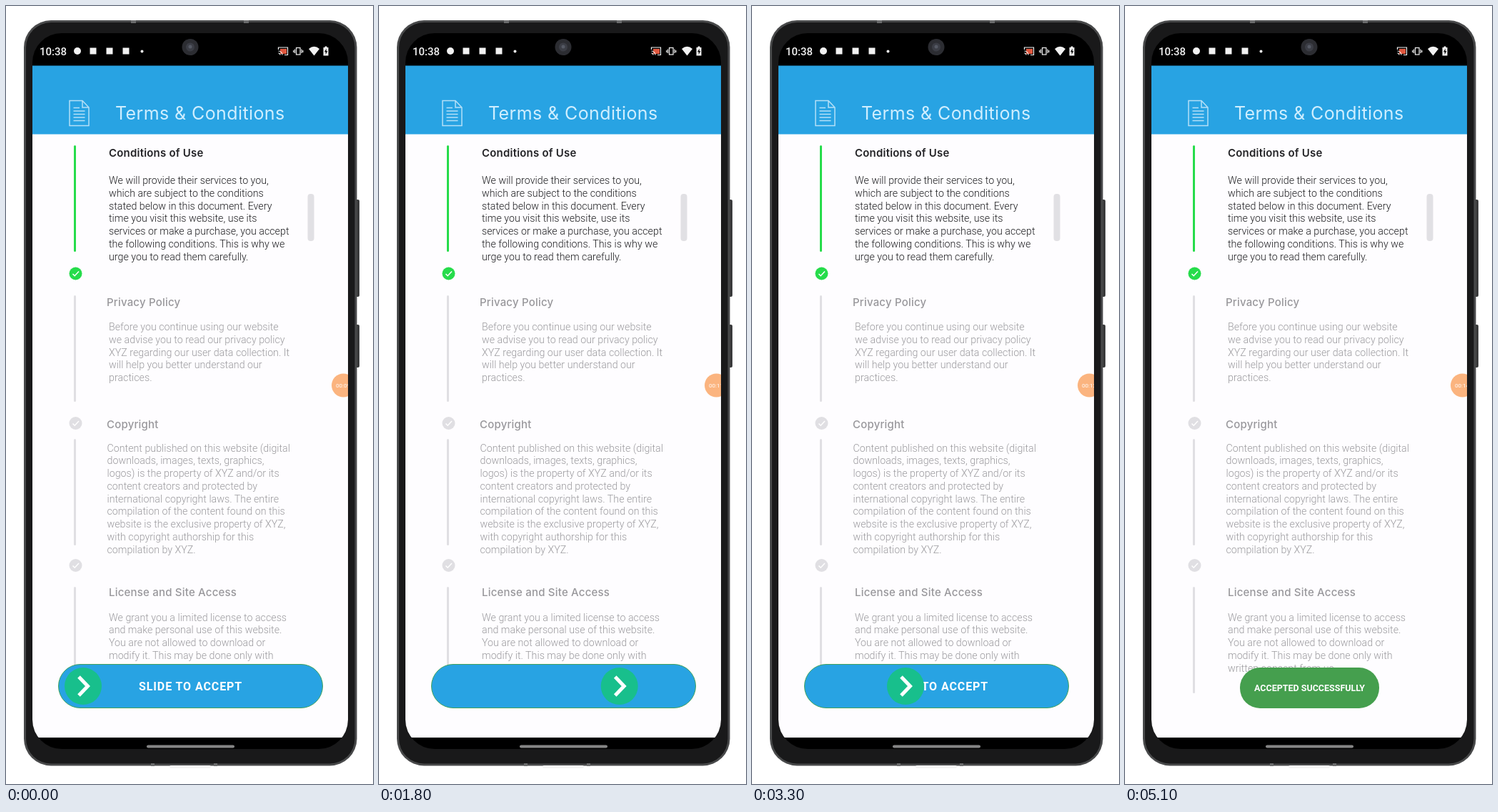
An HTML page for the animation above (5200 ms loop, 514x1089 px).

```html
<!DOCTYPE html>
<html lang="en">
<head>
<meta charset="utf-8">
<title>Terms &amp; Conditions</title>
<style>
  html, body { margin: 0; width: 100%; height: 100%; overflow: hidden; background: #fff; }
  svg { display: block; width: 100%; height: 100%; font-family: Roboto, sans-serif; }
  .title { font: 400 25px Inter, sans-serif; letter-spacing: .4px; fill: #cfeeff; }
  .heading { font: 500 15px Inter, sans-serif; letter-spacing: .2px; fill: #98979b; }
  .body { font-size: 14.25px; font-weight: 300; fill: #9b9a9e; }
  .active .heading { font-weight: 600; fill: #232326; }
  .active .body { fill: #1d1d20; }
  .caps { font-weight: 700; fill: #fff; }
</style>
</head>
<body>
<svg viewBox="0 0 514 1089">
  <defs>
    <clipPath id="screen"><rect x="37" y="38" width="442" height="1002" rx="41"/></clipPath>
    <clipPath id="uncovered"><rect id="uncoveredRect" y="922" width="400" height="60"/></clipPath>
  </defs>

  <!-- phone body -->
  <g fill="#3a3b3c">
    <rect x="488" y="271" width="7" height="136" rx="2"/>
    <rect x="488" y="446" width="7" height="60" rx="2"/>
  </g>
  <rect x="25" y="20" width="466.500" height="1043.500" rx="38" fill="#48494a"/>
  <rect x="28" y="23" width="460.500" height="1037.500" rx="35" fill="#19191a"/>
  <g fill="#6b6c6d">
    <rect x="175" y="20" width="7" height="4"/>
    <rect x="333" y="20" width="7" height="4"/>
    <rect x="203" y="1060" width="5" height="4"/>
    <rect x="291" y="1060" width="5" height="4"/>
  </g>
  <rect x="229" y="1063" width="58" height="4" rx="2" fill="#f4f4f4"/>

  <g clip-path="url(#screen)">
    <rect x="37" y="38" width="442" height="1002"/>
    <rect x="37" y="179" width="442" height="845" fill="#fefdff"/>
    <rect x="37" y="83.500" width="442" height="96" fill="#28a3e3"/>
    <rect x="197" y="1034.500" width="123" height="4" rx="2" fill="#858585"/>

    <!-- status bar -->
    <circle cx="258" cy="57.500" r="11.500" fill="#2c2d32"/>
    <circle cx="258" cy="57.500" r="6" fill="#3b3d45"/>
    <circle cx="258" cy="57" r="2.500" fill="#555964"/>
    <g fill="#f2f2f2">
      <text x="47" y="68.500" font-size="15" font-weight="500">10:38</text>
      <circle cx="100" cy="63" r="5"/>
      <rect x="117.500" y="58.500" width="9" height="9"/>
      <rect x="140.500" y="58.500" width="9" height="9"/>
      <rect x="163.500" y="58.500" width="9" height="9"/>
      <circle cx="190.500" cy="63.500" r="2"/>
      <path d="M424 60Q431.500 53.500 439 60L431.500 69.500Z"/>
      <path d="M444.500 58H446.500V56.500H449.500V58H451.500V69.500H444.500Z"/>
    </g>
    <path d="M448.800 59.500L446 64.300H447.700V68L450.300 63H448.600Z" fill="#000"/>
    <rect x="384" y="60" width="9" height="7" fill="#e0583f"/>
    <g fill="none" stroke="#f2f2f2" stroke-width="1.200">
      <path d="M381.500 61V58H394.500V68.500H390M381.500 63A5.500 5.500 0 0 1 387 68.500M381.500 66A2.500 2.500 0 0 1 384 68.500"/>
      <rect x="406.500" y="58.500" width="5.500" height="9.500"/>
      <path d="M404.500 60.500V66M402.700 62V65M414 60.500V66M415.800 62V65"/>
    </g>

    <!-- header -->
    <g fill="none" stroke="#b5e0f7" stroke-width="1.500">
      <path d="M89 132.500H107L116 142V167.500H89ZM107 132.500V142H116"/>
      <path d="M94.500 142.500H103M94.500 147H110.500M94.500 151.500H110.500M94.500 156H110.500M94.500 160.500H110.500"/>
    </g>
    <text class="title" x="153" y="159">Terms &amp; Conditions</text>

    <g id="sections"></g>
    <rect x="422.500" y="263" width="9" height="66" rx="4" fill="#e1e0e4"/>

    <!-- recorder bubble -->
    <circle cx="472.500" cy="531" r="16.500" fill="#fbb47f"/>
    <text id="clock" x="462" y="534" font-size="8" fill="#fff"></text>

    <g id="slider">
      <rect x="73.500" y="921.500" width="370" height="61" rx="30.500" fill="#28a3e3" stroke="#42a25c"/>
      <text class="caps" x="186" y="958" font-size="16" letter-spacing=".9" clip-path="url(#uncovered)">SLIDE TO ACCEPT</text>
      <g id="knob">
        <circle r="26" fill="#18bf8c"/>
        <path d="M-6-13L6.500 0L-6 13" fill="none" stroke="#fff" stroke-width="5"/>
      </g>
    </g>

    <g id="toast">
      <rect x="161" y="926" width="195" height="57" rx="28" fill="#459f4e"/>
      <text class="caps" x="181" y="959" font-size="12.500">ACCEPTED SUCCESSFULLY</text>
    </g>
  </g>
</svg>

<script>
const LOOP = 5200, ACCEPTED_AT = 3800, LINE_HEIGHT = 17.77;
const get = id => document.getElementById(id);

// bar: top of the progress bar; check: centre of the tick below it
const sections = [
  { title: 'Conditions of Use', x: 144, y: 211, textX: 144, textY: 249, bar: 195, check: 374.5, lines: [
    'We will provide their services to you,', 'which are subject to the conditions',
    'stated below in this document. Every', 'time you visit this website, use its',
    'services or make a purchase, you accept', 'the following conditions. This is why we',
    'urge you to read them carefully.'] },
  { title: 'Privacy Policy', x: 141, y: 419.5, textX: 144, textY: 454, bar: 405, check: 584, lines: [
    'Before you continue using our website', 'we advise you to read our privacy policy',
    'XYZ regarding our user data collection. It', 'will help you better understand our', 'practices.'] },
  { title: 'Copyright', x: 141, y: 591, textX: 141.5, textY: 623.5, bar: 606, check: 783, lines: [
    'Content published on this website (digital', 'downloads, images, texts, graphics,',
    'logos) is the property of XYZ and/or its', 'content creators and protected by',
    'international copyright laws. The entire', 'compilation of the content found on this',
    'website is the exclusive property of XYZ,', 'with copyright authorship for this',
    'compilation by XYZ.'] },
  { title: 'License and Site Access', x: 144, y: 825.5, textX: 144, textY: 860.5, bar: 813, lines: [
    'We grant you a limited license to access', 'and make personal use of this website.',
    'You are not allowed to download or', 'modify it. This may be done only with',
    'written consent from us.'] }
];

get('sections').innerHTML = sections.map((s, i) => {
  const color = i ? '#e0dfe3' : '#26dc4b';
  const tick = s.check ? `<g transform="translate(97.5 ${s.check})">
    <circle r="9" fill="${color}"/>
    <path d="M-4 .5L-1.300 3.200L4.500-3" fill="none" stroke="#fff" stroke-width="1.500"/></g>` : '';
  const lines = s.lines.map((line, n) =>
    `<text class="body" x="${s.textX}" y="${s.textY + n * LINE_HEIGHT}">${line}</text>`).join('');
  return `<g class="${i ? '' : 'active'}">
    <rect x="95" y="${s.bar}" width="3" height="149" rx="1.500" fill="${color}"/>${tick}
    <text class="heading" x="${s.x}" y="${s.y}">${s.title}</text>${lines}</g>`;
}).join('');

// [time, knob centre], eased between neighbours
const drag = [[0, 108], [1100, 404], [1500, 404], [2480, 105], [2960, 105], [ACCEPTED_AT, 410]];

function knobX(t) {
  const i = Math.max(1, drag.findIndex(([time]) => time > t));
  const [t0, x0] = drag[i - 1], [t1, x1] = drag[i];
  const u = (t - t0) / (t1 - t0);
  return x0 + (x1 - x0) * u * u * (3 - 2 * u);
}

function draw(now) {
  const t = now % LOOP;
  const accepted = t >= ACCEPTED_AT;
  get('slider').style.display = accepted ? 'none' : '';
  get('toast').style.display = accepted ? '' : 'none';
  if (!accepted) {
    const x = knobX(t);
    get('knob').setAttribute('transform', `translate(${x} 952)`);
    get('uncoveredRect').setAttribute('x', x - 24);
  }
  const seconds = Math.floor(9.2 + t / 1000);
  get('clock').textContent = '00:' + String(seconds).padStart(2, '0');
}

const start = performance.now();
function tick() {
  draw(performance.now() - start);
  requestAnimationFrame(tick);
}
tick();
</script>
</body>
</html>
```
